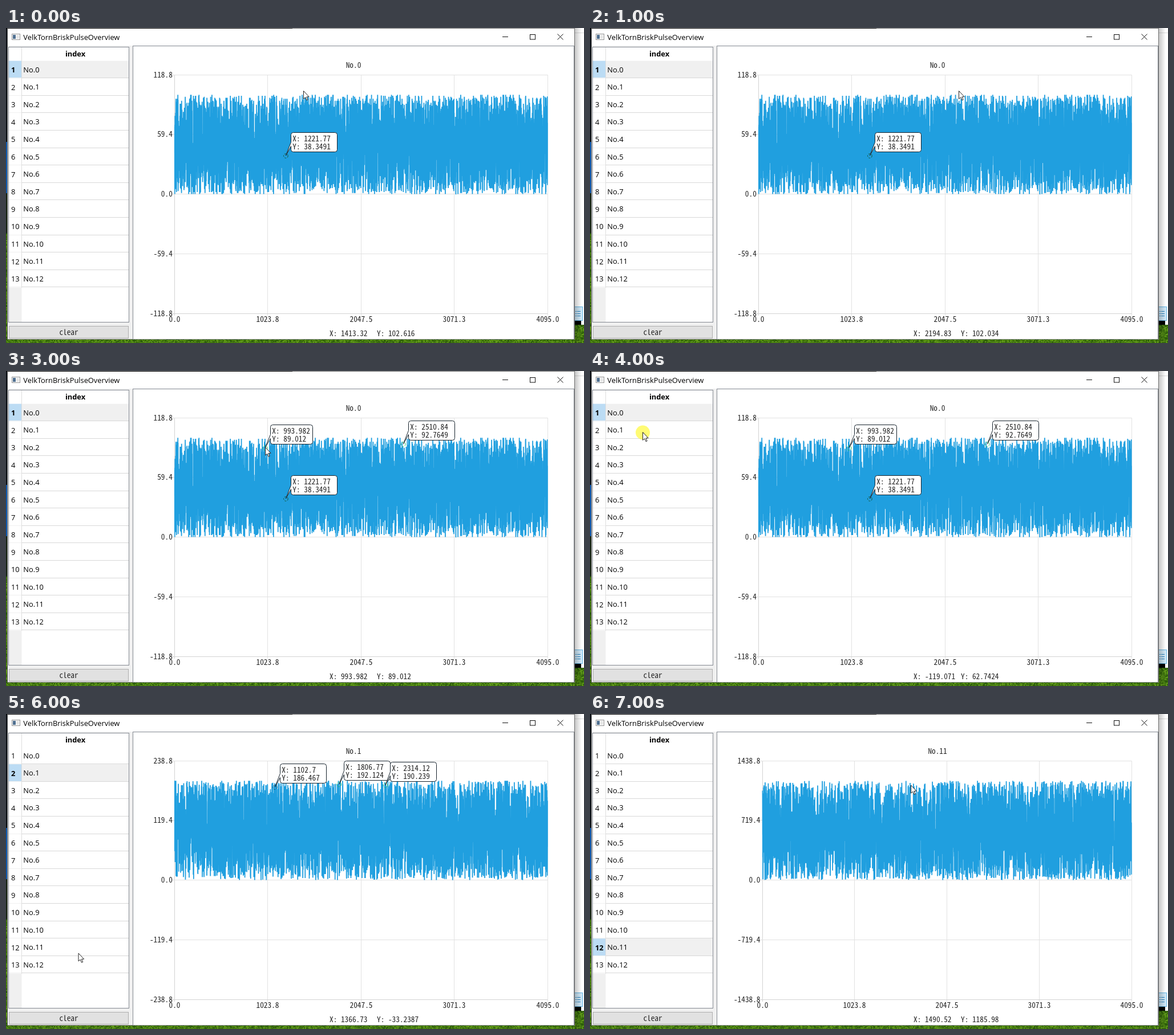
Recreate the animation shown at these times as an HTML page with a canvas. Size 1013 by 553 pixels, loop 8 s.

```html
<!DOCTYPE html>
<html lang="en">
<head>
<meta charset="utf-8">
<title>Noise chart</title>
<style>
  html, body { margin: 0; width: 100%; height: 100%; overflow: hidden; background: #fff; }
  canvas { display: block; width: 1013px; height: 553px; }
</style>
</head>
<body>
<canvas id="stage" width="1013" height="553"></canvas>
<script>
const W = 1013, H = 553;
const ctx = document.getElementById('stage').getContext('2d');

const UI = '"Open Sans", "Noto Sans", sans-serif';
const MONO = '"Noto Sans Mono CJK SC", "Noto Sans Mono CJK JP", "Liberation Mono", monospace';
const uiFont = (bold) => `${bold ? 'bold ' : ''}12.85px ${UI}`;

// Pick the size that gives the half-width cell of the chart font.
const CELL = 6.65;
ctx.font = `100px ${MONO}`;
const monoFont = `${(CELL * 100 / ctx.measureText('0').width).toFixed(2)}px ${MONO}`;

const PLOT = { right: 949.3, top: 82.3, mid: 291.6, bottom: 501 };
const POINTS = 4096;
const CHARTS = {
  0: { left: 295.3, peak: 99 },
  1: { left: 295.3, peak: 199 },
  11: { left: 302, peak: 1199 }
};

const DARK = '#14532d', TEAL = '#1d5566', GREEN = '#22c55e';
const first = [1221.77, 38.3491, DARK];
const pair = [first, [993.982, 89.012, GREEN], [2510.84, 92.7649, GREEN]];
const left = [1102.7, 186.467, TEAL];

// One entry per second: selected row, cursor tip, status values, callouts.
const STEPS = [
  { row: 0, at: [521.5, 110.5], status: ['1413.32', '102.616'], tips: [first] },
  { row: 0, at: [646.5, 110.5], status: ['2194.83', '102.034'], tips: [first] },
  { row: 0, at: [697.3, 128.5], status: ['2505.66', '95.1104'], tips: [first] },
  { row: 0, at: [454.5, 134], status: ['993.982', '89.012'], tips: pair },
  { row: 0, at: [92.5, 107.5], status: ['-119.071', '62.7424'], tips: pair, press: true },
  { row: 1, at: [594.5, 123], status: ['1853.36', '192.124'], tips: [left, [1806.77, 192.124, TEAL]] },
  { row: 1, at: [127, 420], status: ['1366.73', '-33.2387'],
    tips: [left, [1806.77, 192.124, GREEN], [2314.12, 190.239, GREEN]] },
  { row: 11, at: [562.5, 125], status: ['1490.52', '1185.98'], tips: [] }
];

function generator(seed) {
  return () => {
    seed = (Math.imul(seed, 214013) + 2531011) | 0;
    return (seed >>> 16) & 0x7fff;
  };
}

function rect(c, x, y, w, h, color) {
  c.fillStyle = color;
  c.fillRect(x, y, w, h);
}

function frame(c, x, y, w, h, fill, edge) {
  rect(c, x, y, w, h, edge);
  rect(c, x + 1, y + 1, w - 2, h - 2, fill);
}

function line(c, x1, y1, x2, y2, color, width = 1) {
  c.strokeStyle = color;
  c.lineWidth = width;
  c.beginPath();
  c.moveTo(x1, y1);
  c.lineTo(x2, y2);
  c.stroke();
}

function text(c, str, x, y, font, align = 'left', color = '#000') {
  c.font = font;
  c.textAlign = align;
  c.fillStyle = color;
  c.fillText(str, x, y);
}

const mono = (c, str, x, y, align) => text(c, str, x, y, monoFont, align, '#222');

function layer(paint) {
  const canvas = document.createElement('canvas');
  canvas.width = W;
  canvas.height = H;
  paint(canvas.getContext('2d'));
  return canvas;
}

function paintGrass(c, x, y, w, h) {
  const rand = generator(7);
  for (let i = 0; i < w; i += 2) {
    for (let j = 0; j < h; j += 2) {
      const v = rand() / 32768;
      rect(c, x + i, y + j, Math.min(2, w - i), Math.min(2, h - j),
        `rgb(${40 + v * 60}, ${88 + v * 70}, ${8 + v * 18})`);
    }
  }
}

function paintDesktop(c) {
  rect(c, 0, 0, W, H, '#fff');
  rect(c, 0, 0, 4, 200, '#10141a');
  rect(c, 0, 200, 4, 90, '#1560b8');
  rect(c, 0, 290, 4, 70, '#1c2a18');
  paintGrass(c, 0, 360, 4, 187);
  paintGrass(c, 0, 546, W, 7);
  line(c, 997, 8.5, W, 8.5, '#dcdcdc');
  frame(c, 990, 489, 21, 25, '#cfe8f8', '#62b4e4');
  for (let i = 0; i < 3; i++) {
    rect(c, 998, 497 + i * 4, 2, 1, '#2f86c0');
    rect(c, 1001, 497 + i * 4, 6, 1, '#2f86c0');
  }
  rect(c, 997, 514, 11, 7, '#000');
  paintGrass(c, 997, 521, 16, 32);
  const shade = c.createLinearGradient(997, 0, 1009, 0);
  shade.addColorStop(0, 'rgba(0,0,0,.22)');
  shade.addColorStop(1, 'rgba(0,0,0,0)');
  rect(c, 997, 0, 12, H, shade);
}

function paintWindow(c) {
  rect(c, 3, 0, 994, 547, '#f0f0f0');
  rect(c, 3, 1, 993, 30, '#fff');
  rect(c, 0, 0, 502, 1, '#000');
  rect(c, 502, 0, 495, 1, '#6a6a6a');
  rect(c, 996, 0, 1, 547, '#6e6e6e');
  rect(c, 2, 0, 1, 547, '#555');
  rect(c, 3, 546, 994, 1, '#777');

  frame(c, 10, 10, 15, 11, '#fff', '#929292');
  rect(c, 12, 12, 5, 7, '#4f6f8f');
  rect(c, 18, 12, 5, 7, '#e6e6e6');
  text(c, 'VelkTornBriskPulseOverview', 30.3, 20.5, uiFont());
  line(c, 870, 15.5, 880, 15.5, '#111');
  c.strokeRect(918.5, 11.5, 9, 8.5);
  line(c, 966.5, 10.5, 976.5, 20.5, '#111');
  line(c, 976.5, 10.5, 966.5, 20.5, '#111');

  frame(c, 4, 33, 212, 484, '#fff', '#828790');
  rect(c, 5, 455.5, 22.5, 60.5, '#f0f0f0');
  text(c, 'index', 121.5, 50.3, uiFont(true), 'center');

  frame(c, 5, 523, 210, 22, '#e1e1e1', '#adadad');
  mono(c, 'clear', 110, 539, 'center');
  frame(c, 222, 31, 774, 516, '#fff', '#828790');
}

function paintRows(c, selected) {
  const step = 30.6;
  for (let i = 0; i < 13; i++) {
    const y = 57.6 + i * step, on = i === selected;
    if (on) {
      rect(c, 5, y, 22.5, step, '#bcdcf4');
      rect(c, 28, y, 186.5, step, '#f0f0f0');
    }
    const edge = Math.round(y + step) - 0.5;
    line(c, 5, edge, 27, edge, '#f0f0f0');
    line(c, 28, edge, 215, edge, '#d8d8d8');
    text(c, String(i + 1), 9, y + 20.3, uiFont(on));
    text(c, 'No.' + i, 30.3, y + 19.9, uiFont());
  }
  line(c, 27.5, 34, 27.5, 456, '#dedede');
}

const scaleX = (chart, v) => chart.left + v / (POINTS - 1) * (PLOT.right - chart.left);
const scaleY = (chart, v) => PLOT.mid - v / (chart.peak * 1.2) * (PLOT.mid - PLOT.top);

function paintChart(c, row) {
  const chart = CHARTS[row], { left } = chart, { right, top, bottom } = PLOT;
  const limit = chart.peak * 1.2;
  const labels = ['0.0', '1023.8', '2047.5', '3071.3', '4095.0'];
  for (let i = 0; i < 5; i++) {
    const x = Math.floor(left + (right - left) * i / 4) + 0.5;
    const y = Math.floor(top + (bottom - top) * i / 4) + 0.5;
    line(c, x, top, x, bottom + 4, i ? '#e2e2e2' : '#d2d2d2');
    line(c, left - 4, y, right, y, i < 4 ? '#e2e2e2' : '#d2d2d2');
    mono(c, labels[i], x, 516, 'center');
    mono(c, (limit * (2 - i) / 2).toFixed(1), left - 3.5, y + 4.2, 'right');
  }
  mono(c, 'No.' + row, 609, 70, 'center');

  const rand = generator(1);
  for (let i = 0; i < row * POINTS; i++) rand();
  c.save();
  c.beginPath();
  c.rect(left - 0.5, top, right - left + 1, bottom - top);
  c.clip();
  c.beginPath();
  for (let i = 0; i < POINTS; i++) {
    c.lineTo(scaleX(chart, i), scaleY(chart, rand() % (chart.peak + 1)));
  }
  c.strokeStyle = '#209fdf';
  c.lineWidth = 1.8;
  c.lineJoin = 'bevel';
  c.stroke();
  c.restore();
}

function drawCallout(chart, [vx, vy, color]) {
  const ax = scaleX(chart, vx), ay = scaleY(chart, vy);
  const yText = 'Y: ' + vy;
  const x = Math.round(ax + 8.5) + 0.5, y = Math.round(ay - 41) + 0.5;
  const w = Math.round(yText.length * CELL + 14.5), h = 34, r = 4;

  ctx.beginPath();
  ctx.moveTo(x + r, y);
  ctx.arcTo(x + w, y, x + w, y + h, r);
  ctx.arcTo(x + w, y + h, x, y + h, r);
  ctx.arcTo(x, y + h, x, y, r);
  ctx.lineTo(x, y + h - 10);
  ctx.lineTo(ax, ay);
  ctx.lineTo(x, y + h - 17);
  ctx.arcTo(x, y, x + w, y, r);
  ctx.closePath();
  ctx.fillStyle = '#fff';
  ctx.fill();
  ctx.strokeStyle = '#16222c';
  ctx.lineWidth = 1;
  ctx.lineJoin = 'round';
  ctx.stroke();
  mono(ctx, 'X: ' + vx, x + 2.8, y + 15.3);
  mono(ctx, yText, x + 2.8, y + 29.3);

  ctx.beginPath();
  ctx.arc(ax, ay + 0.5, 3.8, 0, Math.PI * 2);
  ctx.setLineDash([3, 2]);
  ctx.strokeStyle = color;
  ctx.stroke();
  ctx.setLineDash([]);
}

function drawCursor([x, y], press) {
  if (press) {
    ctx.beginPath();
    ctx.arc(x, y + 0.5, 12.5, 0, Math.PI * 2);
    ctx.fillStyle = 'rgba(255,250,70,.75)';
    ctx.fill();
  }
  const shape = [[0, 0], [0, 14], [3.2, 11.2], [5.5, 16.3], [7.6, 15.4], [5.4, 10.4], [9.6, 10.2]];
  ctx.beginPath();
  for (const [dx, dy] of shape) ctx.lineTo(x + dx, y + dy);
  ctx.closePath();
  ctx.fillStyle = '#fff';
  ctx.fill();
  ctx.strokeStyle = '#222';
  ctx.lineWidth = 1;
  ctx.lineJoin = 'miter';
  ctx.stroke();
}

const scenes = {};
for (const row of [0, 1, 11]) {
  scenes[row] = layer((c) => {
    paintDesktop(c);
    paintWindow(c);
    paintRows(c, row);
    paintChart(c, row);
  });
}

function draw({ row, at, status, tips, press }) {
  ctx.drawImage(scenes[row], 0, 0);
  for (const tip of tips) drawCallout(CHARTS[row], tip);
  mono(ctx, 'X: ' + status[0], 567, 541);
  mono(ctx, 'Y: ' + status[1], 650, 541);
  drawCursor(at, press);
}

let shown = -1;
function tick() {
  const step = Math.floor(performance.now() / 1000) % STEPS.length;
  if (step !== shown) draw(STEPS[shown = step]);
  requestAnimationFrame(tick);
}
tick();
</script>
</body>
</html>
```
